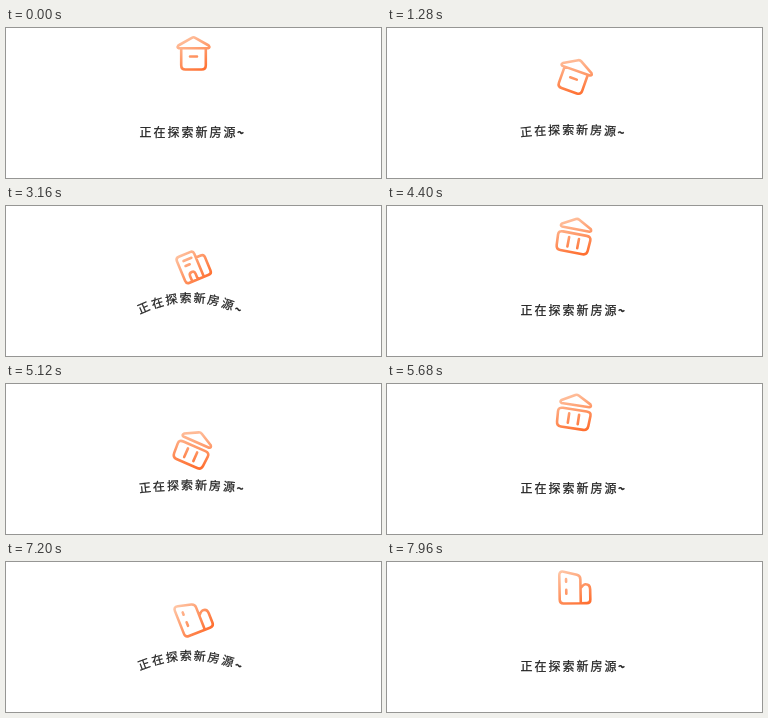
Animation of 375x150 px, one loop 8000 ms. Source, as an HTML page:

```html
<!DOCTYPE html>
<html lang="zh">
<head>
<meta charset="utf-8">
<style>
  html, body { margin: 0; width: 100%; height: 100%; overflow: hidden; background: #fff; }
  svg { display: block; width: 375px; height: 150px; }
  #icons path { fill: none; stroke: url(#glow); stroke-width: 2.6; stroke-linecap: round; stroke-linejoin: round; }
  text { font: 12px "Noto Sans CJK SC", "Noto Sans CJK", sans-serif; fill: #222; stroke: #222; stroke-width: .25; text-anchor: middle; }
</style>
</head>
<body>
<svg viewBox="0 0 375 150">
  <defs>
    <linearGradient id="glow" gradientUnits="userSpaceOnUse" x1="-9" y1="-18" x2="9" y2="18">
      <stop offset="0" stop-color="#ffc4a3"/>
      <stop offset="1" stop-color="#ff6f30"/>
    </linearGradient>
  </defs>
  <g id="icons">
    <path d="M-1.7-15.7Q0-16.7 1.7-15.7L15.2-8Q17-6 14.5-5.2H-14.5Q-17-6-15.2-8Z
             M-12.3-5V11.8Q-12.3 16-8.1 16H8.1Q12.3 16 12.3 11.8V-5 M-3.5 3H3.5"/>
    <path d="M5.3 14.3H-10.2Q-13.6 14.3-13.6 11V-10.4Q-13.6-13.8-10.2-13.8H1.9Q5.3-13.8 5.3-10.4V14.3H10.5Q13.8 14.3 13.8 11V-3.2Q13.8-6.5 10.5-6.5H5.3
             M-7.5-8H1 M-7.5-2.7H-3 M-7.2 14V8.3Q-7.2 5.2-4.2 5.2Q-1.2 5.2-1.2 8.3V14"/>
    <path d="M-1.7-16.7Q0-17.6 1.7-16.7L14.6-9.7Q16.4-7.5 14-6.8H-14Q-16.4-7.5-14.6-9.7Z
             M-12-2.2H12Q16.6-2.2 16.4 1.8L15.8 12.2Q15.5 16.6 11.3 16.6H-11.3Q-15.5 16.6-15.8 12.2L-16.4 1.8Q-16.6-2.2-12-2.2Z
             M-5 2.3V11.8 M5 2.3V11.8"/>
    <path d="M6 15.8H-11.2Q-15 15.8-15 12V-12.5Q-15-17-10.6-16L2.6-12.6Q6-11.6 6-8.2V15.8H12Q15.6 15.8 15.6 12.2V2Q15.6-3 11-3Q9.3-3 6 .8
             M-8.3-8.5V-6 M-8.3 2.2V6"/>
  </g>
  <g id="label"></g>
</svg>
<script>
const LOOP = 8000, CYCLE = 2000, FRAME = 40;
const icons = [...document.querySelectorAll('#icons path')];
const label = document.getElementById('label');

const glyphs = [...'正在探索新房源~'].map((char, i) => {
  const node = document.createElementNS('http://www.w3.org/2000/svg', 'text');
  const tilde = char === '~';
  node.textContent = char;
  node.setAttribute('y', tilde ? 5.2 : 4.4);
  if (tilde) node.style.fontWeight = 700;
  label.append(node);
  return { node, x: tilde ? 234.5 : 139.5 + 14 * i };
});

// Text bend over one bounce: [ms, amount], positive arches upwards.
const bends = [[960, 0], [1040, -.25], [1080, -.5], [1120, .25], [1160, 1], [1200, .85],
  [1240, .5], [1280, .2], [1320, -.08], [1360, -.06], [1440, 0]];

function bendAt(ms) {
  const next = bends.findIndex(([time]) => time > ms);
  if (next < 1) return 0;
  const [t0, b0] = bends[next - 1], [t1, b1] = bends[next];
  return b0 + (b1 - b0) * (ms - t0) / (t1 - t0);
}

function render(ms) {
  const active = Math.floor(ms / CYCLE), local = ms % CYCLE;
  const drop = 1 - Math.abs(1 - local / 1000);
  const y = 25.5 + 55.5 * drop ** 2.8;
  const angle = 27 * drop * (active % 2 ? -1 : 1);
  icons.forEach((icon, i) => {
    icon.style.display = i === active ? '' : 'none';
    icon.setAttribute('transform', `translate(187.5 ${y}) rotate(${angle})`);
  });

  const bend = bendAt(local);
  for (const { node, x } of glyphs) {
    const u = (x - 186) / 48;
    const dy = -12.5 * bend * (1 - .87 * u * u);
    const tilt = Math.atan(.45 * bend * u) * 180 / Math.PI;
    const px = x - 2 * Math.max(0, bend);
    node.setAttribute('transform', `translate(${px} ${104.2 + dy}) rotate(${tilt})`);
  }
}

const start = performance.now();
function tick() {
  const ms = (performance.now() - start) % LOOP;
  render(Math.floor(ms / FRAME) * FRAME);
  requestAnimationFrame(tick);
}
tick();
</script>
</body>
</html>
```
